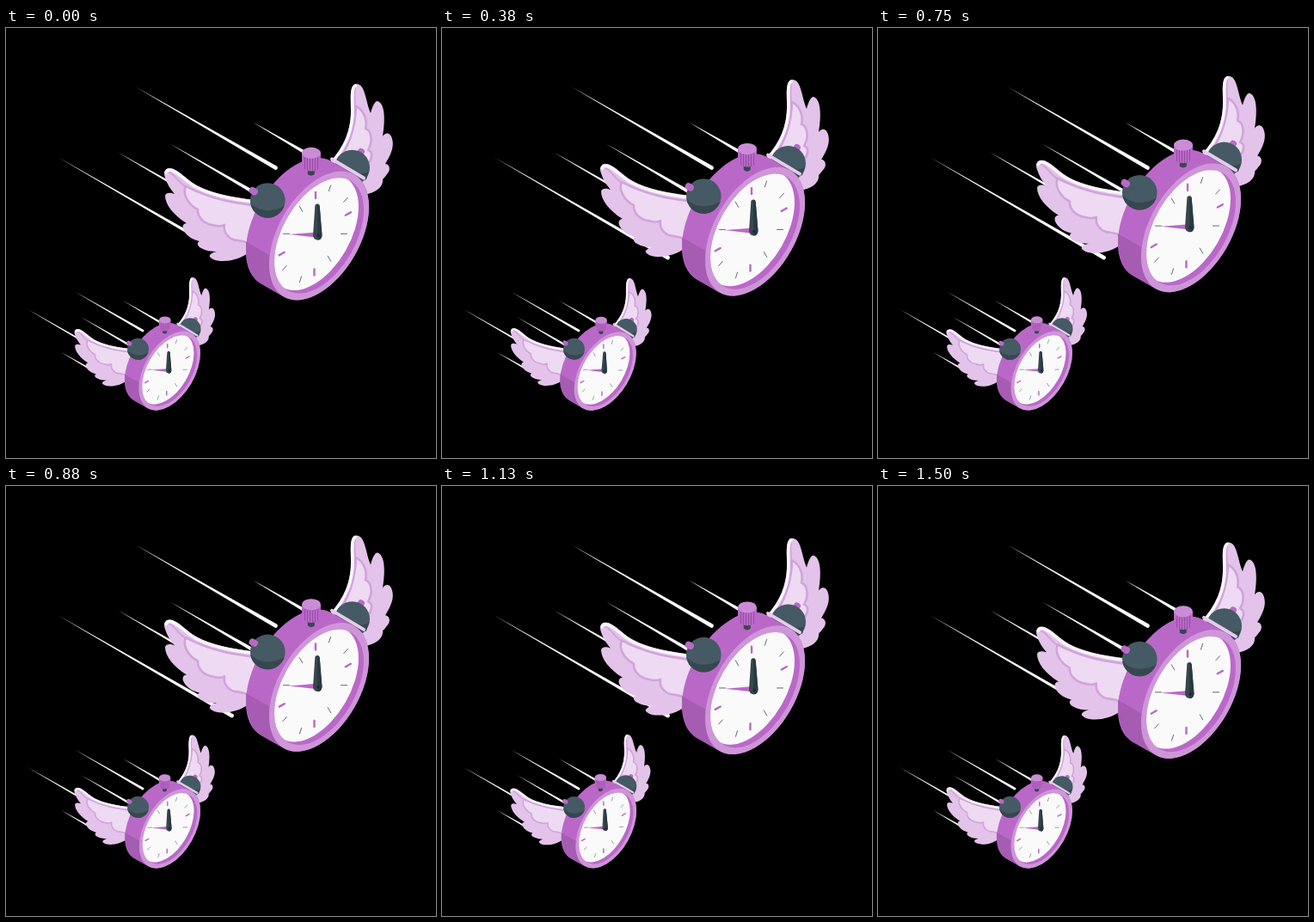
An HTML page for the animation above (1.54 s loop, 500 by 500 pixels).

```html
<!DOCTYPE html>
<html lang="en">
<head>
<meta charset="utf-8">
<title>Flying clocks</title>
<style>
  html, body { margin: 0; width: 100%; height: 100%; overflow: hidden; background: #000; }
  svg { display: block; width: 100vw; height: 100vh; }
  .body { fill: #ba68c8; }
  .shade { fill: #a55cb2; }
  .rim { fill: #cf95d9; }
  .face { fill: #fafafa; }
  .bell { fill: #455a64; }
  .dark { fill: #37474f; }
  .wing { fill: #e3c3e9; }
  .down { fill: #eedaf2; stroke: #d1a4dc; stroke-width: 2.6; stroke-linejoin: round; }
  .line { fill: none; stroke-linecap: round; stroke-linejoin: round; }
  .edge { stroke: #faf5fb; stroke-width: 3.6; }
  .vein { stroke: #d1a4dc; stroke-width: 2; }
  .mark { stroke: #ba68c8; stroke-width: 2.4; }
  .tick { stroke: #37474f; stroke-width: .8; }
  .ridge { stroke: #9350a0; stroke-width: 1; }
</style>
</head>
<body>
<svg viewBox="0 0 500 500">
  <defs>
    <clipPath id="dial"><ellipse rx="73.5" ry="42.4" transform="translate(364 241.5) rotate(-60)"/></clipPath>
    <clipPath id="ball"><circle cx="304.3" cy="200.5" r="20.3"/></clipPath>

    <g id="clock">
      <!-- right wing -->
      <path class="wing" d="M376 158C392 141 401 122 401 96C401 83 399 65 408 65C418 66 418 85 424 99C426 91 429 85 432 85C441 88 441 107 438 126C441 121 447 121 449 129C452 139 446 150 441 158C446 158 448 165 443 170C441 173 439 175 438 176C439 184 431 192 415 194L390 200Z"/>
      <path class="down" d="M382 160C397 142 406 118 407 91C414 94 421 105 418 117C425 119 427 132 421 142C427 144 426 152 421 158L410 180Z"/>
      <path class="line vein" d="M405 98C407 87 404 75 406 70"/>
      <path class="line edge" d="M378 157C393 141 403 122 403 96C403 84 401 70 406 67"/>

      <!-- left wing -->
      <path class="wing" d="M290 200C262 197 238 192 222 183C209 176 200 163 190 163C184 163 183 169 185 174C187 181 191 187 196 193C191 191 186 191 185 195C185 205 195 218 210 227C206 227 204 231 207 236C211 243 218 246 225 248C221 250 223 254 227 256C232 259 239 260 245 260C239 261 236 264 237 266C242 273 266 274 284 260L300 240Z"/>
      <path class="down" d="M292 207C262 203 238 199 209 184C205 192 211 205 223 211C222 220 231 228 240 229C246 231 250 231 254 229C252 238 260 247 270 247C276 248 282 250 288 251Z"/>
      <path class="line vein" d="M208 184C201 180 196 170 190 168"/>
      <path class="line edge" d="M288 202C262 199 238 194 221 185C208 178 199 166 191 165Q187 165 186 168"/>

      <!-- right bell -->
      <rect class="body" x="408.500" y="140" width="8" height="9" rx="3.500" transform="rotate(30 412.500 144.500)"/>
      <circle class="bell" cx="402.500" cy="162.300" r="20.500"/>
      <path class="dark" d="M422.500 165C419 171 409 171 395 160L400 180L419 176Z"/>
      <path class="line" stroke="#e6cbeb" stroke-width="4" d="M379 152.500L416 174.500"/>

      <!-- case -->
      <path class="body" d="M405 170.400L378 154.900A82 47.400 -60 0 0 296 297.100L323 312.600A82 47.400 -60 0 0 405 170.400Z"/>
      <path class="shade" d="M279.300 248.500L306.300 264C304 288 311 305 323 312.600L296 297.100C284 289 278 270 279.300 248.500Z"/>
      <ellipse class="rim" rx="82" ry="47.400" transform="translate(364 241.500) rotate(-60)"/>
      <g clip-path="url(#dial)">
        <rect class="body" x="300" y="160" width="130" height="165"/>
        <ellipse class="face" rx="73.500" ry="42.400" transform="translate(358 238) rotate(-60)"/>
      </g>
      <path class="line mark" d="M360 191v7M358.500 280.500v7M394.800 217.800l6-3.400M317.700 264.200l6-3.400"/>
      <g id="ticks"></g>

      <!-- hands -->
      <path class="body" d="M329 240L358 237.700V243.300Z"/>
      <path class="dark" d="M359.300 207Q359.300 204.500 362 204.500Q364.500 204.500 364.700 207L367.500 241Q367 246.500 362.300 246.500Q357.500 246 357 241Z"/>
      <path fill="#2b3940" d="M362 204.500Q364.500 204.500 364.700 207L367.500 241Q367 246.500 362.300 246.500Z"/>
      <circle cx="363" cy="241.500" r="1.800" fill="#1f2a30"/>

      <!-- crown -->
      <path class="dark" d="M350.800 163h8v7q-4 3.600-8 0Z"/>
      <path class="body" d="M344 145.500V162Q354.800 171 366 162V145.500Z"/>
      <path class="line ridge" d="M347.500 151v13M350.500 152v13.500M353.500 152.500v13.500M356.500 152.500v13.500M359.500 152v13.500M362.500 151v13"/>
      <ellipse cx="355" cy="145.300" rx="11" ry="6.500" fill="#cb8cd6"/>

      <!-- left bell -->
      <circle class="bell" cx="304.300" cy="200.500" r="20.300"/>
      <path class="dark" clip-path="url(#ball)" d="M282 200C290 213 309 217 326 205V224H282Z"/>
      <rect class="body" x="282.500" y="185.700" width="10.500" height="8" rx="3.700" transform="rotate(30 287.700 189.700)"/>
    </g>
  </defs>

  <rect width="500" height="500"/>
  <g id="streaks" class="face"></g>
  <use id="small" href="#clock"/>
  <use id="big" href="#clock"/>
</svg>
<script>
  const $ = id => document.getElementById(id);

  function addPath(parent, d, cls) {
    const path = document.createElementNS('http://www.w3.org/2000/svg', 'path');
    path.setAttribute('d', d);
    if (cls) path.setAttribute('class', cls);
    parent.append(path);
  }

  // Tapered streak: sharp start, round end of the given width
  function streak(x, y, x2, y2, width) {
    const len = Math.hypot(x2 - x, y2 - y), r = width / 2;
    const nx = (y - y2) / len * r, ny = (x2 - x) / len * r;
    addPath($('streaks'), `M${x} ${y}L${x2 + nx} ${y2 + ny}A${r} ${r} 0 0 0 ${x2 - nx} ${y2 - ny}Z`);
  }

  [
    [150, 68, 313.500, 162.500, 4.800],
    [287, 109.500, 360, 152, 4.600],
    [190.500, 134.500, 300, 198, 4.800],
    [130, 144.500, 240, 208, 4.400],
    [60, 150, 262.500, 267, 4.800],
    [25, 327, 110, 376, 2.900],
    [80, 306.500, 159, 352, 2.900],
    [136, 317, 185, 345.500, 2.900],
    [87, 336, 150, 372.500, 2.900],
    [64, 377, 110, 403.500, 2.900]
  ].forEach(s => streak(...s));

  // Thin dial marks come in opposite pairs around the dial centre
  for (const [x, y] of [[17, -53], [35.500, -39.500], [33.500, 0], [16.500, 29]]) {
    const gap = 3.500 / Math.hypot(x, y);
    for (const side of [1, -1]) {
      const at = k => `${359.500 + side * k * x} ${239.300 + side * k * y}`;
      addPath($('ticks'), `M${at(1 - gap)}L${at(1 + gap)}`, 'line tick');
    }
  }

  const LOOP = 1540, STEPS = 37;

  function draw(now) {
    const step = Math.min(STEPS - 1, Math.floor((now % LOOP + 4) * 0.024));
    const p = (step + 1) / STEPS % 1;
    const lift = 10 * (1 - Math.abs(1 - 2 * p));
    const tilt = p < 0.25 ? 4 * p : p < 0.75 ? 2 - 4 * p : 4 * p - 4;
    $('big').setAttribute('transform', `translate(0 ${0.5 - lift})`);
    $('small').setAttribute('transform', `rotate(${tilt} 161 367.5) translate(-33.6 250) scale(.615)`);
  }

  let start;
  function tick(now) {
    start ??= now;
    draw(now - start);
    requestAnimationFrame(tick);
  }
  draw(0);
  requestAnimationFrame(tick);
</script>
</body>
</html>
```
